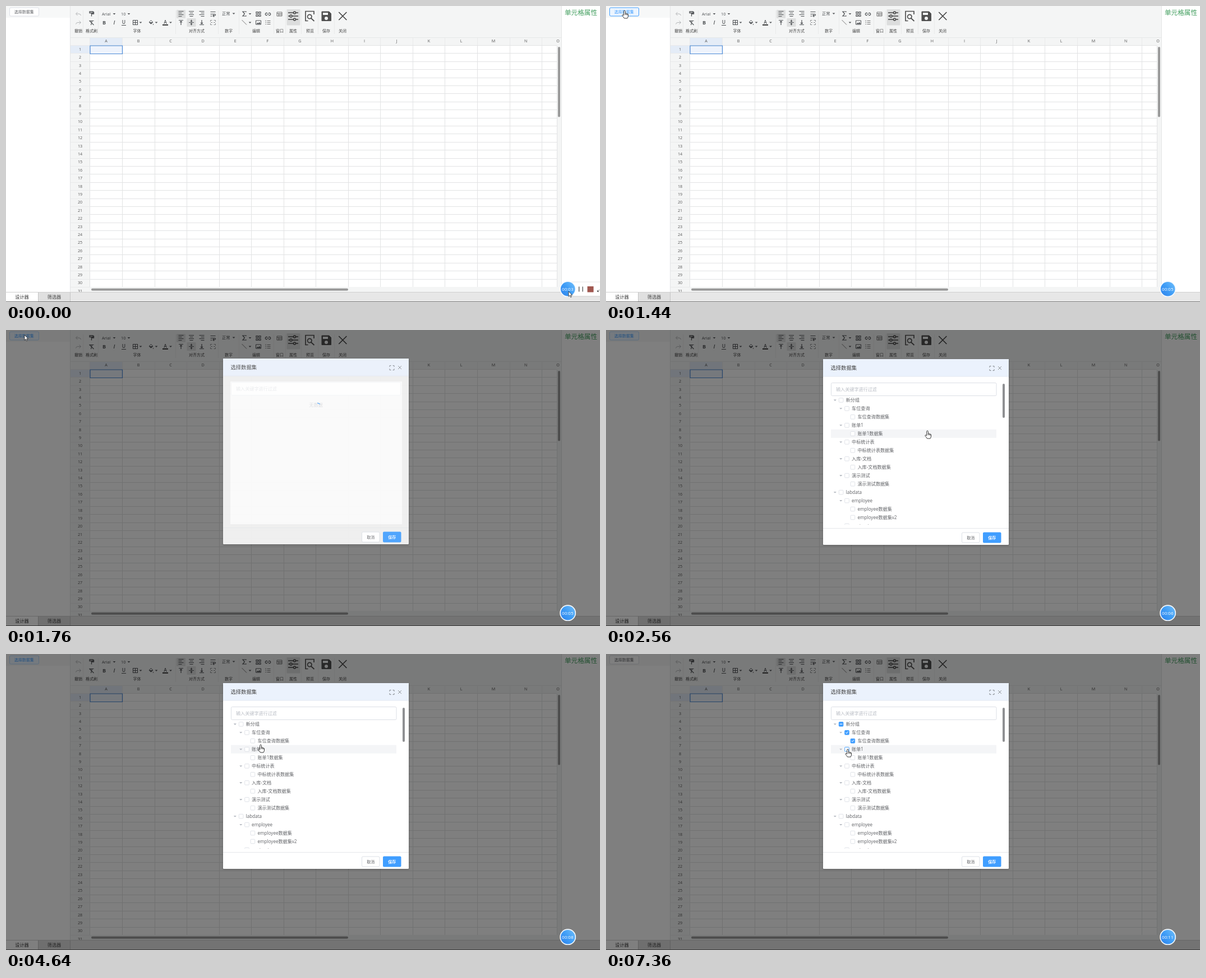
An HTML page with a canvas for the animation above (8 s loop, 1059 px wide and 529 px high).

```html
<!DOCTYPE html>
<html lang="zh">
<head>
<meta charset="utf-8">
<style>
html, body { margin: 0; width: 100%; height: 100%; overflow: hidden; background: #fff; }
canvas { display: block; }
</style>
</head>
<body>
<canvas id="stage" width="1059" height="529"></canvas>
<script>
const c = document.getElementById('stage').getContext('2d');
const LOOP = 8000, STEP = 160, BLUE = '#409eff', INK = '#505356', BAR = '#f4f5f5';
const FONT = '"Open Sans", "Noto Sans CJK SC", "Noto Sans CJK", sans-serif';

// Pointer path: time, x, y
const PATH = [
  [80, 1003, 510], [1120, 33, 9], [1760, 33, 9], [2400, 590, 190], [2560, 573, 181],
  [3360, 477, 200], [3680, 477, 201], [4320, 441, 154], [4640, 454, 163],
  [4960, 454, 163], [5440, 440, 155], [6480, 440, 155], [7360, 431, 171]
];

// Tree rows: level, label
const TREE = [
  [0, '新分组'], [1, '车位查询'], [2, '车位查询数据集'], [1, '账单1'], [2, '账单1数据集'],
  [1, '中标统计表'], [2, '中标统计表数据集'], [1, '入库-文档'], [2, '入库-文档数据集'],
  [1, '演示测试'], [2, '演示测试数据集'], [0, 'labdata'], [1, 'employee'],
  [2, 'employee数据集'], [2, 'employee数据集v2'], [1, 'contract']
];

const clamp = v => Math.max(0, Math.min(1, v));

function rect(x, y, w, h, fill) {
  c.fillStyle = fill;
  c.fillRect(x, y, w, h);
}

function box(x, y, w, h, r, fill, stroke, lw = 1) {
  c.beginPath();
  c.roundRect(x, y, w, h, r);
  if (fill) { c.fillStyle = fill; c.fill(); }
  if (stroke) { c.strokeStyle = stroke; c.lineWidth = lw; c.stroke(); }
}

function text(s, x, y, size, color = INK, align = 'center', style = '') {
  c.font = `${style} ${size}px ${FONT}`;
  c.textAlign = align;
  c.fillStyle = color;
  c.fillText(s, x, y + size * .36);
}

function icon(d, x, y, color = INK, lw = 1, fill) {
  const p = new Path2D(d);
  c.save();
  c.translate(x, y);
  if (fill) { c.fillStyle = fill; c.fill(p); }
  if (lw) { c.strokeStyle = color; c.lineWidth = lw; c.stroke(p); }
  c.restore();
}

const caret = (x, y, color = INK, s = 2.4) => icon(`M${-s}-1h${2 * s}l${-s} ${s}z`, x, y, 0, 0, color);
const hline = (x, y, w, color) => rect(x, y, w, 1, color);
const vline = (x, y, h, color) => rect(x, y, 1, h, color);

function pointerAt(t) {
  let i = 0;
  while (i < PATH.length - 1 && PATH[i + 1][0] <= t) i++;
  const a = PATH[i], b = PATH[i + 1] || a;
  const u = clamp((t - a[0]) / (b[0] - a[0] || 1)), e = u * u * (3 - 2 * u);
  return { x: a[1] + (b[1] - a[1]) * e, y: a[2] + (b[2] - a[2]) * e };
}

function toolbar() {
  rect(115, 0, 876, 56, BAR);
  for (const x of [137, 164, 302, 378, 415, 477, 498, 526, 556, 585]) vline(x, 8, 42, '#e9eaea');
  [['撤销', 129], ['格式刷', 152.5], ['字体', 233.5], ['对齐方式', 340], ['数字', 397], ['编辑', 446],
   ['窗口', 488], ['属性', 512], ['预览', 542], ['保存', 571], ['关闭', 600]]
    .forEach(([s, x]) => text(s, x, 44.5, 7, '#444'));

  const undo = 'M-1.5-3L-4.5 0L-1.5 3M-4 0H1Q4 0 4.5 3';
  icon(undo, 129, 14, '#b4b6b8');
  c.save();
  c.translate(258, 0);
  c.scale(-1, 1);
  icon(undo, 129, 29.5, '#b4b6b8');
  c.restore();
  icon('M-3.5-4h6v2.5h-6zM2.5-3h1.5v3h-4v4.5', 152.5, 14, INK, 1.3);
  icon('M-3-3.5H4M1-3.5L-1 4M-4-4L4 4', 152.5, 30, INK, 1.1);

  text('Arial', 171, 14, 7.3, INK, 'left');
  text('10', 205, 14, 7.3, INK, 'left');
  text('正常', 385, 13.5, 7.3, INK, 'left');
  for (const [x, y] of [[193, 14], [219, 14], [406, 13.5], [435, 14], [240, 29.5], [268, 29.5], [293.5, 29.5], [435, 29.5]])
    caret(x, y);

  text('B', 175, 29.5, 9, INK, 'center', 'bold');
  text('I', 193, 29.5, 9.5, INK, 'center', 'italic 600');
  text('U', 210, 29, 8.5, INK, 'center', '600');
  hline(206, 34, 8, INK);
  icon('M-4-4h8v8h-8zM0-4v8M-4 0h8', 230.5, 29.5, INK, 1.1);
  icon('M-3.5 0L0-3.5L3.5 0L0 3z', 258.5, 29, INK, 1);
  icon('M-3.5 0h7L0 3zM4 2.5l1 2h-2z', 258.5, 29, INK, 0, INK);
  text('A', 284, 28.5, 8.5, INK, 'center', '600');
  rect(279, 33, 10, 1.6, '#111');

  box(304, 7, 16, 15, 1, '#dedfdf');
  box(322.5, 22, 16, 15, 1, '#dedfdf');
  icon('M-4.5-4.5h9M-4.5-1.5h6M-4.5 1.5h9M-4.5 4.5h6', 312, 14, INK, 1.1);
  icon('M-4.5-4.5h9M-3-1.5h6M-4.5 1.5h9M-3 4.5h6', 330.5, 14, INK, 1.1);
  icon('M-4.5-4.5h9M-1.5-1.5h6M-4.5 1.5h9M-1.5 4.5h6', 349, 14, INK, 1.1);
  icon('M-4.5-4h9M-4.5 0H3Q5 0 4.5 2Q4 3 0 3M2 1L0 3L2 5M-4.5 3.5h3', 369, 14.5, INK, 1.1);
  icon('M-4-4h8M0 4.5v-7M-2-.5L0-2.5L2-.5', 312, 29.5, INK, 1.2);
  icon('M-4.5 0h9M0-5v4M0 5v-4M-1.5-3L0-1.5L1.5-3M-1.5 3L0 1.5L1.5 3', 330.5, 29.5, INK, 1.1);
  icon('M-4 4h8M0-4.5v7M-2 .5L0 2.5L2 .5', 349, 29.5, INK, 1.2);
  icon('M-1.5-4h-3v2.5M1.5-4h3v2.5M-1.5 4h-3v-2.5M1.5 4h3v-2.5M-4 0h3M4 0h-3', 369, 29.5, '#8f9193');

  icon('M3-3V-4H-3L.5 0L-3 4H3V3', 425, 14, INK, 1.2);
  icon('M-4-4h3v3h-3zM1-4h3v3h-3zM-4 1h3v3h-3zM1 1h3v3h-3z', 450, 14.5, INK, 1.2);
  icon('M-1-2.2h-1.5a2.2 2.2 0 0 0 0 4.4h1.5M1-2.2h1.5a2.2 2.2 0 0 1 0 4.4h-1.5M-2 0h4', 467, 14.5, INK, 1.2);
  icon('M-4.5-4.5L4 4', 425, 29.5, '#777');
  icon('M-4.5-3.5h9v7h-9z', 450, 29.5, INK, 1);
  icon('M-3.5 2.8L-1.5 0L0 1.5L2-1L4 2.8z', 450, 29.5, 0, 0, INK);
  icon('M-1.5-3h6M-1.5 0h6M-1.5 3h6M-4-4v2M-4.5 0h1.5M-4.5 3h1.5', 467, 29.5, '#777');
  icon('M-4.5-3.5h9v7h-9zM-4.5-1h9M-1.5-1v4.5M-1.5 1.3h6', 487.5, 14.5, '#666', .9);

  box(500.5, 6, 24, 28.5, 1, '#dcdddd');
  icon('M-9-6h9M5-6h4M-9 0h2.5M-1.5 0H9M-9 6H0M5 6h4', 512, 18, '#444', 1.7);
  for (const [x, y] of [[514.5, 12], [508, 18], [514.5, 24]]) box(x - 2, y - 2, 4, 4, 2, null, '#444', 1.5);
  icon('M-3 8.5H-7.5V-8.5H7.5V-3M3.5 1A3.7 3.7 0 1 1-3.9 1A3.7 3.7 0 1 1 3.5 1M2.5 4L8 9', 541.5, 18, '#505050', 1.7);
  icon('M-8-8H5L8.5-4.5V8.5H-8z', 571, 18, '#505050', 1, '#505050');
  rect(565, 12, 9, 4, BAR);
  box(568, 19, 6, 6, 3, BAR);
  icon('M-7-7L7 7M7-7L-7 7', 600.3, 18, '#444', 1.7);
}

function sheet() {
  rect(115, 56, 876, 455, BAR);
  rect(150, 71, 832, 431, '#fff');
  rect(150, 56, 57.5, 14.5, '#e4ecf7');
  rect(115, 70.5, 34.5, 14.5, '#e4ecf7');
  hline(115, 56, 876, '#e6e8e8');
  c.save();
  c.beginPath();
  c.rect(115, 56, 876, 455);
  c.clip();
  for (let i = 0; i < 15; i++) {
    const x = Math.round(149.4 + i * 57.55);
    vline(x, 57, 14, '#e9eaeb');
    vline(x, 71, 431, '#e2e3e4');
    text(String.fromCharCode(65 + i), i == 14 ? 984 : 178.5 + i * 57.55, 62.7, 7.2, '#585858');
  }
  for (let i = 0; i < 31; i++) {
    const y = Math.round(70 + i * 14.4);
    hline(115, y, 35, '#e9eaeb');
    if (y < 502) hline(150, y, 832, '#e2e3e4');
    text(i + 1, 132, 77.3 + i * 14.4, 7.2, '#585858');
  }
  rect(150, 502, 841, 9, BAR);
  c.restore();
  vline(982, 71, 431, '#e2e3e4');
  box(150, 71, 57.5, 14.5, 0, '#eef3fc', '#4b89d6', 1.2);
  box(984, 73, 4, 125.5, 2, '#999');
  box(152, 504.7, 458, 4, 2, '#999');
}

function page(t) {
  rect(0, 0, 1059, 529, '#fff');
  rect(0, 0, 114, 21, '#f7f8f8');
  vline(114, 0, 511, '#e4e5e6');
  toolbar();
  sheet();
  vline(990, 0, 511, '#e4e5e6');
  text('单元格属性', 1025, 12, 11.6, '#3f9d5c');

  const active = t >= 1120 && t < 5920, pressed = active && t < 1600;
  box(6.5, 3, 52, 15, 2, active ? '#ecf5ff' : '#fff', pressed ? BLUE : active ? '#b9dbfd' : '#dcdfe6');
  text('选择数据集', 32.3, 10.5, 7, active ? BLUE : '#606266');

  rect(0, 511, 1059, 18, '#e7e7e7');
  hline(0, 511, 1059, '#cfcfcf');
  rect(0, 512, 57, 16, '#fff');
  rect(57, 512, 58, 16, '#e0e0e0');
  vline(57, 512, 16, '#c4c4c4');
  vline(114, 512, 16, '#c4c4c4');
  text('设计器', 28.5, 520.3, 8.2, '#333');
  text('筛选器', 86, 520.3, 8.2, '#444');
  hline(0, 528, 1059, '#777');
}

function checkbox(x, y, state, hot) {
  box(x - 3.7, y - 3.7, 7.6, 7.6, 1, state ? BLUE : '#fff', state || hot ? BLUE : '#dcdfe6', .9);
  if (state == 1) icon('M-2 0L-.5 1.7L2.2-1.8', x, y, '#fff', 1);
  if (state == 2) icon('M-2.2 0h4.6', x, y, '#fff', 1.1);
}

function tree(t, p) {
  const over = t >= 2400 && p.x > 401 && p.x < 696 ? Math.round((p.y - 125) / 15) : -1;
  c.save();
  c.beginPath();
  c.rect(400, 118, 300, 230);
  c.clip();
  TREE.forEach(([level, label], i) => {
    const y = 125.3 + i * 14.97, x = 419 + level * 10.4;
    if (i == over) rect(401, y - 7.5, 295, 15, '#f4f5f7');
    if (level < 2) caret(x - 10.7, y, '#b4b8c0', 2.6);
    const state = t >= 6080 && i < 3 ? (i ? 1 : 2) : 0;
    checkbox(x, y, state, Math.abs(p.x - x) < 5 && Math.abs(p.y - y) < 6);
    text(label, x + 8.7, y, 8.1, '#606266', 'left');
  });
  c.restore();
  box(707, 96, 4, 61, 2, '#8f9092');
}

function dialog(t, p, u) {
  const loaded = t >= 2080;
  c.save();
  c.globalAlpha = u;
  c.translate(0, -10 * (1 - u));
  c.save();
  c.shadowColor = 'rgba(0,0,0,.3)';
  c.shadowBlur = 3;
  c.shadowOffsetY = 1;
  box(387, 52, 331, 332, 1.5, '#fff');
  c.restore();
  rect(387, 52, 331, 31, '#ebf2fd');
  hline(387, 82.5, 331, '#e3e9f2');
  text('选择数据集', 400.5, 68, 9.3, '#444', 'left');
  icon('M-1.5-4h-2.5v2.5M1.5-4h2.5v2.5M-1.5 4h-2.5v-2.5M1.5 4h2.5v-2.5', 688, 68.5, '#85898f');
  icon('M-3-3L3 3M3-3L-3 3', 702, 68, '#85898f', .9);

  box(401.5, 94.5, loaded ? 294.5 : 302, 23, 2, '#fff', '#dcdfe6');
  text('输入关键字进行过滤', 410, 106, 8.1, '#b8bcc4', 'left');
  if (loaded) tree(t, p);
  else {
    text('无数据', 552.7, 135, 8.1, '#909399');
    if (t >= 1760) {
      rect(400, 93, 306, 255, 'rgba(255,255,255,.75)');
      const a = -1.35 + (t - 1760) / 160;
      c.beginPath();
      c.arc(552.6, 142.5, 11.5, a, a + .45 + (t - 1760) / 130);
      c.strokeStyle = BLUE;
      c.lineWidth = 1.2;
      c.stroke();
    }
  }

  hline(387, 354, 331, '#e6e7ea');
  box(634.5, 362, 31.5, 18, 2, '#fff', '#dcdfe6');
  text('取消', 650.3, 371, 7, '#606266');
  box(672, 361.5, 32.5, 19, 2, BLUE);
  text('保存', 688.2, 371, 7, '#fff', 'center', 'bold');
  c.restore();
}

function recorder(t) {
  if (t < 480) {
    c.save();
    c.shadowColor = 'rgba(0,0,0,.15)';
    c.shadowBlur = 3;
    rect(1002, 494, 60, 24, '#fff');
    c.restore();
    rect(1021, 501.5, 1.2, 9, '#444');
    rect(1027.5, 501.5, 1.2, 9, '#444');
    rect(1036.5, 501, 11, 10.5, '#a0574f');
    icon('M-1.5 2.5L2-1M-1.5 0v2.5h2.5', 1056, 508, '#555');
  }
  const g = c.createLinearGradient(990, 515, 1013, 497);
  g.addColorStop(0, '#2f86ee');
  g.addColorStop(.5, '#3f9df6');
  g.addColorStop(1, '#66b8fa');
  c.beginPath();
  c.arc(1001.7, 505.7, 13.6, 0, 7);
  c.fillStyle = g;
  c.fill();
  c.strokeStyle = '#f4f9ff';
  c.lineWidth = 1.6;
  c.stroke();
  const sec = Math.floor(3.84 + t / 1000);
  text('00:' + String(sec).padStart(2, '0'), 1001.3, 506, 8, '#fff');
}

function pointer(t, p) {
  const hand = t >= 1120 && t < 1600 || t >= 2400;
  if (hand)
    icon('M-1.3 8V.4Q-1.2-.9 0-.9Q1.2-.9 1.3.4V4Q2.8 3.4 3.4 4.6Q4.7 4.1 5.2 5.2Q6.4 5 6.5 6.3V9Q6.4 11 5 13H-.5Q-1.5 11-4 8.3Q-4.4 7-3.2 6.7Q-2.2 6.8-1.3 8M1.3 4v3M3.4 4.6v2.6M5.2 5.2v2.2',
      p.x, p.y, '#222', .9, '#fff');
  else
    icon('M0 0V9.3L2.2 7.3L3.7 10.6L5.2 9.9L3.7 6.7H6.6z', p.x, p.y, '#222', .8, '#fff');
}

function draw(now) {
  const t = Math.floor(now % LOOP / STEP) * STEP;
  const p = pointerAt(t), u = clamp((t - 1480) / 310);
  page(t);
  if (t >= 1600) {
    rect(0, 0, 1059, 529, `rgba(0,0,0,${.5 * Math.min(1, u * 1.65)})`);
    dialog(t, p, u);
  }
  recorder(t);
  pointer(t, p);
}

const start = performance.now();
function tick() {
  draw(performance.now() - start);
  requestAnimationFrame(tick);
}
tick();
</script>
</body>
</html>
```
